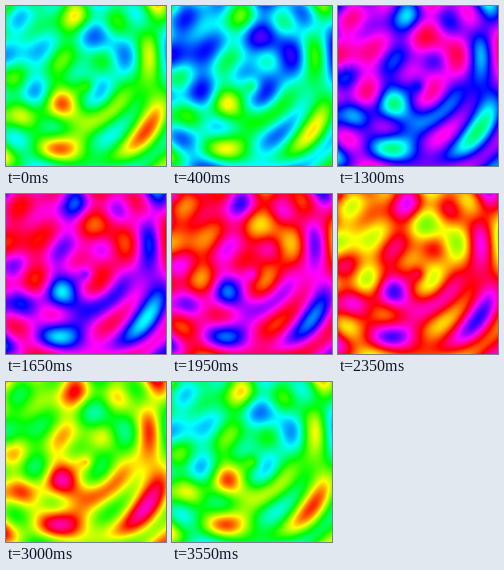
Recreate the animation shown at these times as an HTML page with a canvas. Size 200 by 200 pixels, loop 3600 ms.

```html
<!DOCTYPE html>
<html lang="en">
<head>
<meta charset="utf-8">
<title>Plasma</title>
<style>
html, body { margin: 0; width: 100%; height: 100%; overflow: hidden; background: #0f0; }
canvas { display: block; width: 100vw; height: 100vh; }
</style>
</head>
<body>
<canvas id="stage" width="200" height="200"></canvas>
<script>
const SIZE = 200, LOOP = 3600, STEP = 50;
const FINE = 10;              // palette entries per degree
const TURN = 360 * FINE;

const ctx = document.getElementById('stage').getContext('2d');
const image = ctx.createImageData(SIZE, SIZE);
const pixels = new Uint32Array(image.data.buffer);

// One channel of a fully saturated hue, as a trapezoid around the wheel
function channel(deg, offset) {
  const k = (offset + deg / 60) % 6;
  return Math.round(255 * (1 - Math.max(0, Math.min(k, 4 - k, 1))));
}

const palette = Uint32Array.from({ length: TURN }, (_, i) => {
  const deg = i / FINE;
  const r = channel(deg, 5), g = channel(deg, 3), b = channel(deg, 1);
  return (255 << 24 | b << 16 | g << 8 | r) >>> 0;
});

// Sum of four waves, scaled to 0..1
function wave(x, y) {
  const c = SIZE / 2;
  const sum = Math.sin(x / 16) + Math.sin(y / 32)
    + Math.sin(Math.hypot(x - c, y - c) / 8)
    + Math.sin(Math.hypot(x, y) / 8);
  return (sum + 4) / 8;
}

// Starting hue in degrees; the curve flattens towards the cold end
const hue = level => 256 * Math.sin(1.1 * level);

const field = Uint16Array.from({ length: SIZE * SIZE }, (_, i) =>
  Math.round(hue(wave(i % SIZE, Math.floor(i / SIZE))) * FINE));

let last = -1;

function draw(now) {
  const step = Math.floor((now % LOOP) / STEP);
  if (step !== last) {
    last = step;
    const shift = step * STEP / LOOP * TURN;
    for (let i = 0; i < pixels.length; i++) {
      pixels[i] = palette[(field[i] + shift) % TURN];
    }
    ctx.putImageData(image, 0, 0);
  }
}

function tick() {
  draw(performance.now());
  requestAnimationFrame(tick);
}

tick();
</script>
</body>
</html>
```
